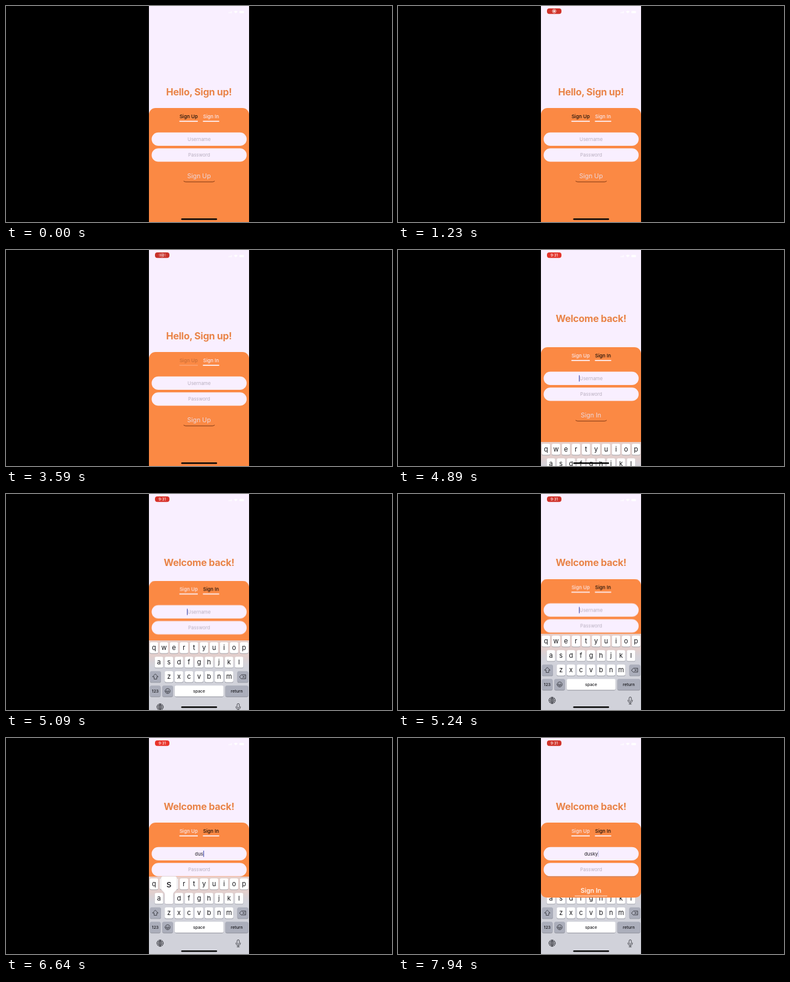
Recreate the animation shown at these times as an HTML page. Size 640 by 360 pixels, loop 8 s.

```html
<!DOCTYPE html>
<html lang="en">
<head>
<meta charset="utf-8">
<title>Sign in screen</title>
<style>
  html, body { margin: 0; width: 100%; height: 100%; overflow: hidden; background: #000; }
  svg { display: block; width: 640px; height: 360px; }
  text { font-family: Inter, Roboto, sans-serif; text-anchor: middle; }

  .title { font-size: 16px; font-weight: 700; letter-spacing: -.25px; fill: #e98448; }
  .tab { font-size: 8.1px; font-weight: 500; }
  .hint { font-size: 7.9px; fill: #b8afbf; }
  .typed { font-size: 7.9px; fill: #1d1a20; }
  .button { font-size: 10.5px; fill: #ecd7dd; }
  .key { font-size: 11px; fill: #16161a; }
  .small { font-size: 6.8px; font-weight: 500; fill: #16161a; }
  .icon { fill: none; stroke: #2a2b31; stroke-width: .8; stroke-linecap: round; stroke-linejoin: round; }

  /* one loop is 8 s, so 1% is 80 ms */
  .up, .in, .fill-up, .fill-in, #heading, #card, #keys { animation: 8s step-end infinite; }
  .up { animation-name: up; }
  .in { animation-name: in; }
  .fill-up { animation-name: fill-up; }
  .fill-in { animation-name: fill-in; }
  #heading { animation-name: heading; }
  #card { animation-name: card; }
  #keys { animation-name: keys; }
  #tab-up { animation: tap-up 8s linear infinite; }
  #tab-in { animation: tap-in 8s linear infinite; }
  #pill { animation: pill 8s linear infinite; }
  #pill rect { animation: pulse 2s -410ms ease-in-out infinite; }
  #rec { animation: rec 8s linear infinite; }
  #clock { animation: clock 8s linear infinite; }

  @keyframes up { 0% { opacity: 1 } 23.6% { opacity: 0 } 44.2% { opacity: 1 } 51.7%, 100% { opacity: 0 } }
  @keyframes in { 0% { opacity: 0 } 23.6% { opacity: 1 } 44.2% { opacity: 0 } 51.7%, 100% { opacity: 1 } }
  @keyframes fill-up { 0% { fill: #1a100a } 23.6% { fill: #f9e6ea } 44.2% { fill: #1a100a } 51.7%, 100% { fill: #f9e6ea } }
  @keyframes fill-in { 0% { fill: #f9e6ea } 23.6% { fill: #1a100a } 44.2% { fill: #f9e6ea } 51.7%, 100% { fill: #1a100a } }
  @keyframes tap-up { 0%, 42.3% { opacity: 1 } 44.2%, 45.5% { opacity: .22 } 48%, 100% { opacity: 1 } }
  @keyframes tap-in {
    0%, 19% { opacity: 1 } 21.1%, 26.1% { opacity: .22 } 28.6%, 47.3% { opacity: 1 }
    49.2%, 54.2% { opacity: .22 } 57.3%, 100% { opacity: 1 }
  }
  @keyframes heading { 0% { transform: none } 61.1%, 100% { transform: translateY(-29px) } }
  @keyframes card {
    0% { transform: none } 61.1% { transform: translateY(-8px) } 62.35% { transform: translateY(-20px) }
    62.98% { transform: translateY(-23.8px) } 63.6% { transform: translateY(-25.5px) }
    64.2% { transform: translateY(-27px) } 64.85% { transform: translateY(-28px) }
    65.5% { transform: translateY(-28.5px) } 67%, 100% { transform: translateY(-29px) }
  }
  @keyframes keys {
    0% { transform: translateY(129px) } 61.1% { transform: translateY(89px) } 62.35% { transform: translateY(38px) }
    62.98% { transform: translateY(22px) } 63.6% { transform: translateY(13px) }
    64.2% { transform: translateY(8px) } 64.85% { transform: translateY(4.5px) }
    65.5% { transform: translateY(2px) } 67%, 100% { transform: none }
  }
  @keyframes pill { 0%, 1.63% { opacity: 0 } 7.2%, 100% { opacity: 1 } }
  @keyframes pulse { 0%, 100% { fill: #c8322b } 50% { fill: #e9342b } }
  @keyframes rec { 0%, 43.75% { opacity: 1 } 46%, 100% { opacity: 0 } }
  @keyframes clock { 0%, 43.75% { opacity: 0 } 46%, 100% { opacity: 1 } }
</style>
</head>
<body>
<svg viewBox="0 0 640 360">
  <defs>
    <clipPath id="screen"><path d="M237 0h166v360h-166z"/></clipPath>
    <linearGradient id="tint" x1="0" y1="0" x2="0" y2="1">
      <stop offset="0" stop-color="#e6cfca"/>
      <stop offset=".55" stop-color="#e2cfcd"/>
      <stop offset="1" stop-color="#d1d2da" stop-opacity="0"/>
    </linearGradient>
  </defs>
  <rect width="640" height="360"/>
  <g clip-path="url(#screen)">
    <rect x="237" width="166" height="360" fill="#f9efff"/>

    <g fill="#fff">
      <path d="M369 10.5h1.2v1.5h-1.2zM371 9.7h1.2v2.3h-1.2zM373 8.8h1.2v3.2h-1.2z"/>
      <path d="M378 9.2q3-2.6 6 0l-3 3z"/>
      <rect x="387" y="8.3" width="7.5" height="3.8" rx="1"/>
    </g>
    <g id="pill">
      <rect x="247" y="4" width="24" height="9.3" rx="4" fill="#e2352c"/>
      <g id="rec">
        <circle cx="259" cy="8.6" r="3" fill="none" stroke="#fff" stroke-width=".8"/>
        <circle cx="259" cy="8.6" r="1.6" fill="#fff"/>
      </g>
      <text id="clock" x="259" y="10.9" font-size="6" font-weight="500" fill="#fff">9:31</text>
    </g>

    <g id="heading">
      <text class="title up" x="320" y="149">Hello, Sign up!</text>
      <text class="title in" x="320" y="149">Welcome back!</text>
    </g>

    <g id="card">
      <rect x="237" y="170" width="166" height="240" rx="11" fill="#fb8944"/>
      <g id="tab-up">
        <text class="tab fill-up" x="302.8" y="186.5">Sign Up</text>
        <path d="M287.5 192.2h30.5" stroke="#fdf3fa" stroke-width="1.7"/>
      </g>
      <g id="tab-in">
        <text class="tab fill-in" x="340" y="186.5">Sign In</text>
        <path d="M326.5 192.2h27" stroke="#fdf3fa" stroke-width="1.7"/>
      </g>
      <g fill="#f9efff">
        <rect x="241.5" y="210.8" width="157.5" height="22.2" rx="11.1"/>
        <rect x="241.5" y="237.3" width="157.5" height="22.2" rx="11.1"/>
      </g>
      <g id="user"></g>
      <text class="hint" x="320.2" y="251.4">Password</text>
      <g id="submit">
        <text class="button up" x="320" y="287.3">Sign Up</text>
        <text class="button in" x="320" y="287.3">Sign In</text>
        <path d="M294.5 291.6q1.5 1.5 4 1.5h43.500q2.500 0 4-1.500" fill="none" stroke="#96481d" stroke-width="1.1"/>
      </g>
    </g>

    <g id="keys">
      <rect x="237" y="231" width="166" height="140" fill="#d1d2da"/>
      <rect x="237" y="231" width="166" height="48" fill="url(#tint)"/>
    </g>

    <g id="reveal" opacity="0">
      <path d="M237 230.600h166v24.400q0 11-11 11h-144q-11 0-11-11z" fill="#fb8944"/>
      <path d="M246 231.200h148" stroke="#b98a78" stroke-width=".8"/>
      <text class="button" x="320" y="258.300" style="fill:#fff3ec;font-weight:600">Sign In</text>
      <path d="M293 263.300h54" stroke="#fbe3d8" stroke-width="1.100"/>
    </g>
    <rect x="290.500" y="353.900" width="59.500" height="2.600" rx="1.300" fill="#060606"/>
  </g>
</svg>
<script>
const LOOP = 8000;
const WORD = "dusky";
const PRESS = [5640, 6040, 6540, 6890, 7240];
const TYPED = [5840, 6190, 6590, 6940, 7290];
const HOLD = 350, FOCUS = 4890, REVEAL = 7840;

const user = document.getElementById("user");
const keys = document.getElementById("keys");

function add(parent, tag, attrs, label = "") {
  const el = document.createElementNS("http://www.w3.org/2000/svg", tag);
  for (const name in attrs) el.setAttribute(name, attrs[name]);
  el.textContent = label;
  return parent.appendChild(el);
}

// Visible only from one time to another, with hard edges.
function show(el, from, to) {
  const at = (ms, opacity) => ({ opacity, offset: ms / LOOP, easing: "steps(1, end)" });
  const end = to < LOOP ? to - 3 : LOOP;
  const start = from > 0 ? from - 3 : 0;
  el.animate([at(0, from > 0 ? 0 : 1), at(start, 1), at(end, 0), at(LOOP, 0)],
    { duration: LOOP, iterations: Infinity });
}

function keyCap(x, y, w, fill) {
  add(keys, "rect", { x: x - w / 2, y: y - 8.4, width: w, height: 18.4, rx: 2.6, fill: "#8e9099" });
  add(keys, "rect", { x: x - w / 2, y: y - 9.2, width: w, height: 18.4, rx: 2.6, fill });
}

function icon(d) { add(keys, "path", { class: "icon", d }); }

// Letter rows
const spots = {};
["qwertyuiop", "asdfghjkl", "zxcvbnm"].forEach((row, r) => {
  [...row].forEach((ch, i) => {
    const x = 320 + (i - (row.length - 1) / 2) * 16.6, y = 243.2 + r * 24.15;
    spots[ch] = [x, y];
    keyCap(x, y, 14, "#fff");
    add(keys, "text", { class: "key", x, y: y + 3.3 }, ch);
  });
});

// Function keys
const GREY = "#abaebb";
keyCap(247.8, 291.5, 18, GREY);
keyCap(392.6, 291.5, 18, GREY);
[[247.5, 17.6, GREY, "123"], [268, 17.6, GREY, ""], [320.2, 81, "#fff", "space"], [382.7, 38, GREY, "return"]]
  .forEach(([x, w, fill, label]) => {
    keyCap(x, 315.4, w, fill);
    add(keys, "text", { class: "small", x, y: 317.7 }, label);
  });
icon("M247.8 287.200l4.500 4.500h-2.300v3.800h-4.400v-3.800h-2.300z");
icon("M387.300 291.600l3-3.300h7.200v6.600h-7.200zM392.400 290l3.200 3.200m0-3.200l-3.200 3.200");
icon("M263.800 315.400a4.200 4.200 0 1 0 8.400 0a4.200 4.200 0 1 0-8.400 0M265.500 316.200q2.500 3.600 5 0zM266.500 313.800v.4M269.500 313.800v.4");
icon("M250.200 342a5.300 5.300 0 1 0 10.600 0a5.300 5.300 0 1 0-10.600 0h10.600M255.500 336.700q-5 5.300 0 10.600q5-5.300 0-10.600v10.600M251.500 339.200q4 1.600 8 0M251.500 344.800q4-1.600 8 0");
icon("M383.100 338.200a1.900 1.900 0 0 1 3.800 0v3.600a1.900 1.900 0 0 1-3.800 0zM381.200 341.500q0 4.300 3.800 4.300t3.800-4.300M385 345.800v2.200m-2 0h4");

// Key previews
const BUBBLE = "M-10-37H10Q13.400-37 13.400-33.500V-17C13.400-12 7.200-12 7.200-6V7q0 2.500-2.500 2.500H-4.700" +
  "q-2.500 0-2.500-2.500V-6C-7.200-12-13.400-12-13.400-17V-33.500Q-13.400-37-10-37Z";
[...WORD].forEach((ch, i) => {
  const pop = add(keys, "g", { transform: `translate(${spots[ch]})`, opacity: 0 });
  add(pop, "path", { d: BUBBLE, fill: "#fff", stroke: "#b5adb5", "stroke-width": .4 });
  add(pop, "text", { x: 0, y: -18.3, "font-size": 16.5, fill: "#16161a" }, ch);
  show(pop, PRESS[i], PRESS[i] + HOLD);
});

// User name field
function caret(x, from, to, opacity = 1) {
  const g = add(user, "g", { opacity: 0 });
  add(g, "rect", { x: x - .5, y: 216.8, width: 1.1, height: 10.4, fill: "#444fae", opacity });
  show(g, from, to);
}

show(add(user, "text", { class: "hint", x: 320.2, y: 224.9 }, "Username"), 0, TYPED[0]);
caret(300.5, FOCUS, TYPED[0]);
[...WORD].forEach((_, i) => {
  const last = i === WORD.length - 1;
  const until = last ? LOOP : TYPED[i + 1];
  const text = add(user, "text", { class: "typed", x: 320.2, y: 224.9, opacity: 0 }, WORD.slice(0, i + 1));
  const end = 320.8 + text.getComputedTextLength() / 2;
  show(text, TYPED[i], until);
  caret(end, TYPED[i], last ? REVEAL : until);
  if (last) caret(end, REVEAL, LOOP, .3);
});

show(document.getElementById("reveal"), REVEAL, LOOP);
</script>
</body>
</html>
```
